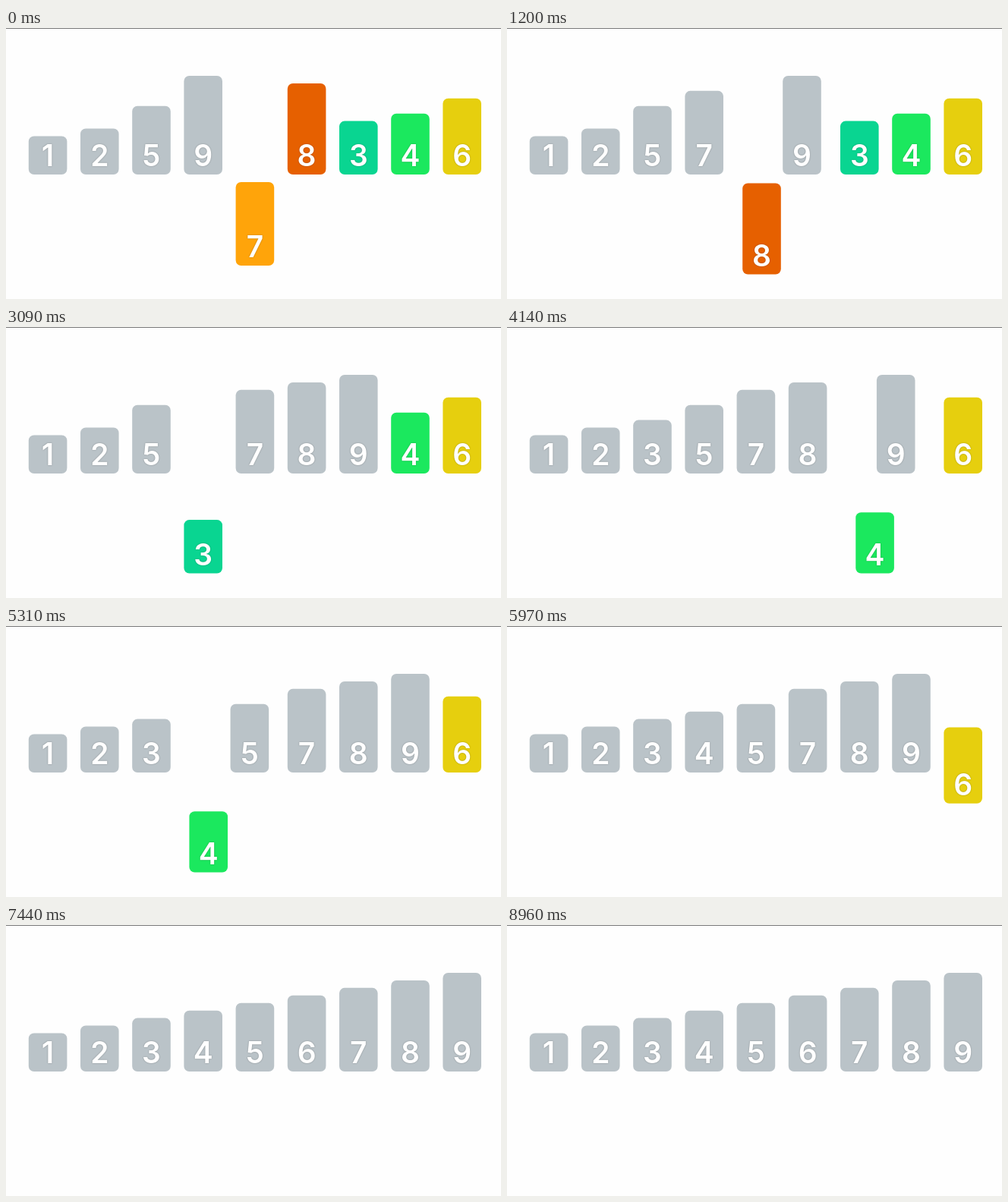
Write an HTML page with a canvas that moves like this. It is 652 px wide and 357 px high and loops after 9390 ms.

```html
<!DOCTYPE html>
<html lang="en">
<head>
<meta charset="utf-8">
<title>Insertion sort</title>
<style>
  html, body { margin: 0; width: 100%; height: 100%; overflow: hidden; background: #fefefe; }
  canvas { display: block; }
</style>
</head>
<body>
<canvas id="stage" width="652" height="357"></canvas>
<script>
const ctx = document.getElementById('stage').getContext('2d');

const LOOP = 9390;
const MOVE = 226;          // length of every move
const SWAP_PERIOD = 378;   // start of one swap to the start of the next
const SLOT = 68.2, BAR_WIDTH = 50.6, BASE = 193, DROP = 131.5;
const GREY = '#bac3c8';
const COLORS = { 3: '#09d591', 4: '#1be85e', 6: '#e6cf0e', 7: '#ffa40a', 8: '#e66000' };

const order = [1, 2, 5, 9, 7, 8, 3, 4, 6];
const bars = order.map((value, slot) => ({ value, slot, moves: [], sortedAt: -Infinity }));

const addMove = (bar, start, dx, dy) => bar.moves.push({ start, dx, dy });

// Run the sort once and schedule each move; the loop begins late in the first drop.
function schedule() {
  const row = [...bars];
  let clock = -183;
  for (let i = 4; i < row.length; i++) {
    const bar = row[i];
    addMove(bar, clock, 0, DROP);
    clock += MOVE + 60;
    for (let j = i; row[j - 1].value > bar.value; j--) {
      addMove(bar, clock, -SLOT, 0);
      addMove(row[j - 1], clock, SLOT, 0);
      [row[j - 1], row[j]] = [bar, row[j - 1]];
      clock += SWAP_PERIOD;
    }
    clock -= 42;
    addMove(bar, clock, 0, -DROP);
    bar.sortedAt = clock + MOVE;
    clock = bar.sortedAt + 72;
  }
}

const ease = u => (1 - Math.cos(Math.PI * Math.min(1, Math.max(0, u)))) / 2;

function drawBar({ value, slot, moves, sortedAt }, time) {
  let x = 29.8 + slot * SLOT, bottom = BASE;
  for (const { start, dx, dy } of moves) {
    const p = ease((time - start) / MOVE);
    x += dx * p;
    bottom += dy * p;
  }
  const height = 50.5 + (value - 1) * 9.94;
  ctx.fillStyle = time >= sortedAt ? GREY : COLORS[value];
  ctx.beginPath();
  ctx.roundRect(x, bottom - height, BAR_WIDTH, height, 7);
  ctx.fill();

  ctx.save();
  ctx.shadowColor = 'rgba(0, 0, 0, .3)';
  ctx.shadowBlur = 2;
  ctx.fillStyle = '#fff';
  ctx.fillText(value, x + BAR_WIDTH / 2, bottom - 11);
  ctx.restore();
}

// The picture advances in steps of about 133 ms, on a 30 ms clock.
const stepStart = n => 30 * Math.round(n * 133 / 30 + 0.1);

function snap(time) {
  let n = Math.floor(time / 133) + 1;
  while (stepStart(n) > time) n--;
  return stepStart(n);
}

function render(now) {
  const time = snap(now % LOOP);
  ctx.fillStyle = '#fefefe';
  ctx.fillRect(0, 0, 652, 357);
  ctx.fillStyle = '#777';
  ctx.fillRect(0, 0, 652, 1);
  ctx.font = '600 39px Inter, sans-serif';
  ctx.textAlign = 'center';
  for (const bar of bars) drawBar(bar, time);
  requestAnimationFrame(() => render(performance.now()));
}

schedule();
render(performance.now());
</script>
</body>
</html>
```
